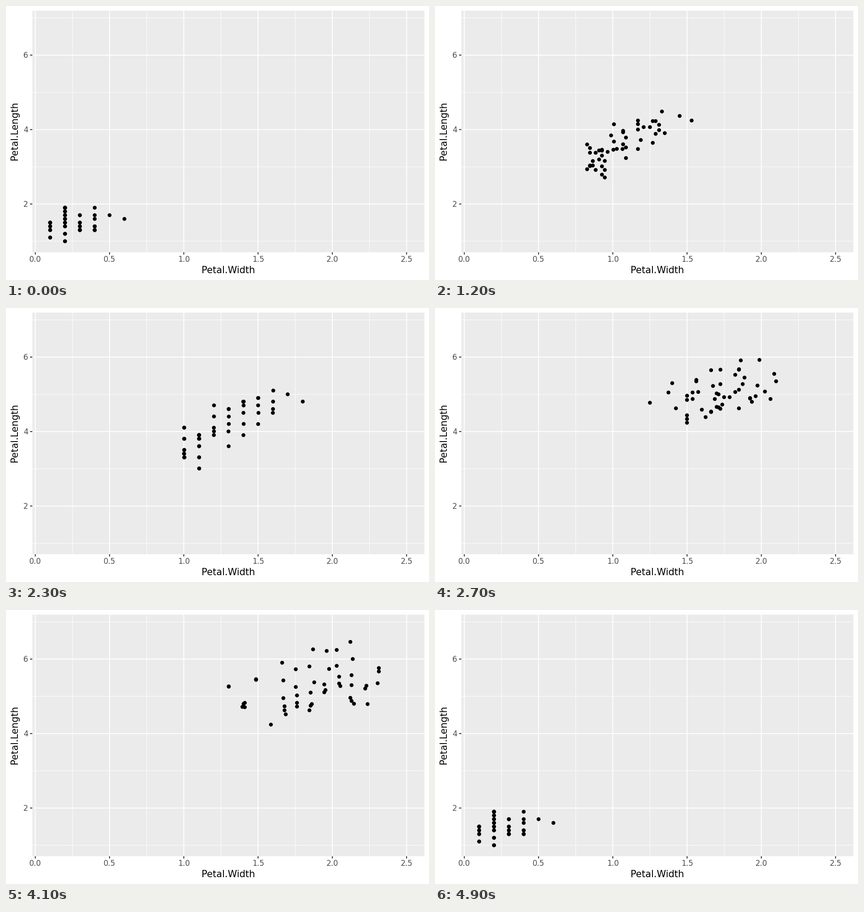
A matplotlib script for the animation above (5000 ms loop, 928 by 603 pixels).

```python
import matplotlib.pyplot as plt
import numpy as np
from matplotlib.animation import FuncAnimation
from matplotlib.patches import Rectangle

W, H = 928, 603
LEFT, RIGHT, TOP, BOTTOM = 57.8, 917.9, 10.1, 541.9
X_MIN, X_MAX, Y_MIN, Y_MAX = -0.02, 2.62, 0.705, 7.195

FRAMES, INTERVAL = 50, 100
MOVE, PERIOD = 11, 17  # steps per move, steps per move plus rest
DOTS = 50

rng = np.random.default_rng(7)


def px(x):
    return LEFT + (x - X_MIN) / (X_MAX - X_MIN) * (RIGHT - LEFT)


def py(y):
    return TOP + (Y_MAX - y) / (Y_MAX - Y_MIN) * (BOTTOM - TOP)


def cloud(first, gap, *columns):
    """Stack dots in columns one tenth apart, each crowded towards its start.

    All values are tenths; gap is the mean distance of dots in a column.
    """
    points = []
    for width, (start, end) in enumerate(columns, first):
        count = 1 + int(np.ceil(abs(end - start) / gap))
        for u in np.linspace(0, 1, count):
            points.append((width, np.round(start + (end - start) * u ** 2)))
    points = rng.permutation(np.resize(points, (DOTS, 2))) / 10
    return np.column_stack([px(points[:, 0]), py(points[:, 1])])


states = [
    cloud(1, 1, (15, 11), (19, 10), (13, 17), (13, 19), (17, 17), (16, 16)),
    cloud(10, 2, (33, 41), (39, 30), (39, 47), (46, 36), (48, 39), (49, 42),
          (45, 51), (50, 50), (48, 48)),
    cloud(14, 3, (56, 56), (50, 51), (58, 58), (45, 45), (48, 63), (50, 61),
          (49, 67), (54, 66), (56, 67), (51, 69), (56, 51), (61, 57)),
]

# At 72 dpi one point is one pixel.
plt.rcParams["font.family"] = "DejaVu Sans"
fig = plt.figure(figsize=(W / 72, H / 72), dpi=72, facecolor="white")
ax = fig.add_axes([0, 0, 1, 1])
ax.set(xlim=(0, W), ylim=(H, 0))
ax.axis("off")


def line(x0, y0, x1, y1, color, width, z):
    ax.plot([x0, x1], [y0, y1], color=color, lw=width, zorder=z,
            solid_capstyle="butt", snap=False)


def grid_x(x, width, z):
    line(px(x), TOP, px(x), BOTTOM, "white", width, z)


def grid_y(y, width, z):
    line(LEFT, py(y), RIGHT, py(y), "white", width, z)


def label(x, y, text, size, color, **kw):
    ax.text(x, y, text, fontsize=size, color=color, va="baseline", **kw)


ax.add_patch(Rectangle((LEFT, TOP), RIGHT - LEFT, BOTTOM - TOP,
                       fc="#ebebeb", ec="none", zorder=0, snap=False))
for x in np.arange(0.25, 2.5, 0.5):
    grid_x(x, 1, 1)
for y in (1, 3, 5, 7):
    grid_y(y, 1, 1)

for x in np.arange(0, 2.6, 0.5):
    grid_x(x, 1.96, 2)
    line(px(x), BOTTOM, px(x), BOTTOM + 5, "#333333", 1.96, 4)
    label(px(x), 562.6, f"{x:.1f}", 16.8, "#4d4d4d", ha="center")
for y in (2, 4, 6):
    grid_y(y, 1.96, 2)
    line(LEFT - 5, py(y), LEFT, py(y), "#333333", 1.96, 4)
    label(48.4, py(y) + 5.8, str(y), 16.8, "#4d4d4d", ha="right")

label((LEFT + RIGHT) / 2, 588, "Petal.Width", 20.6, "black", ha="center")
label(25, (TOP + BOTTOM) / 2 - 1, "Petal.Length", 20.6, "black", ha="center",
      rotation=90, rotation_mode="anchor")

# One colour per dot keeps the dots from snapping to whole pixels.
dots = ax.scatter(*states[0].T, s=8.5 ** 2, c=["black"] * DOTS,
                  linewidths=0, zorder=3)


def ease(p):
    return 4 * p ** 3 if p < 0.5 else 1 - 4 * (1 - p) ** 3


def update(frame):
    # 51 steps are spread over 50 frames, so one step is skipped halfway.
    step = frame + (frame >= FRAMES // 2)
    i, k = divmod(step, PERIOD)
    t = ease(max(0, k - (PERIOD - 1 - MOVE)) / MOVE)
    start, end = states[i], states[(i + 1) % len(states)]
    dots.set_offsets(start + (end - start) * t)
    return [dots]


anim = FuncAnimation(fig, update, frames=FRAMES, interval=INTERVAL,
                     repeat=True, repeat_delay=0, blit=False)
plt.show()
```
